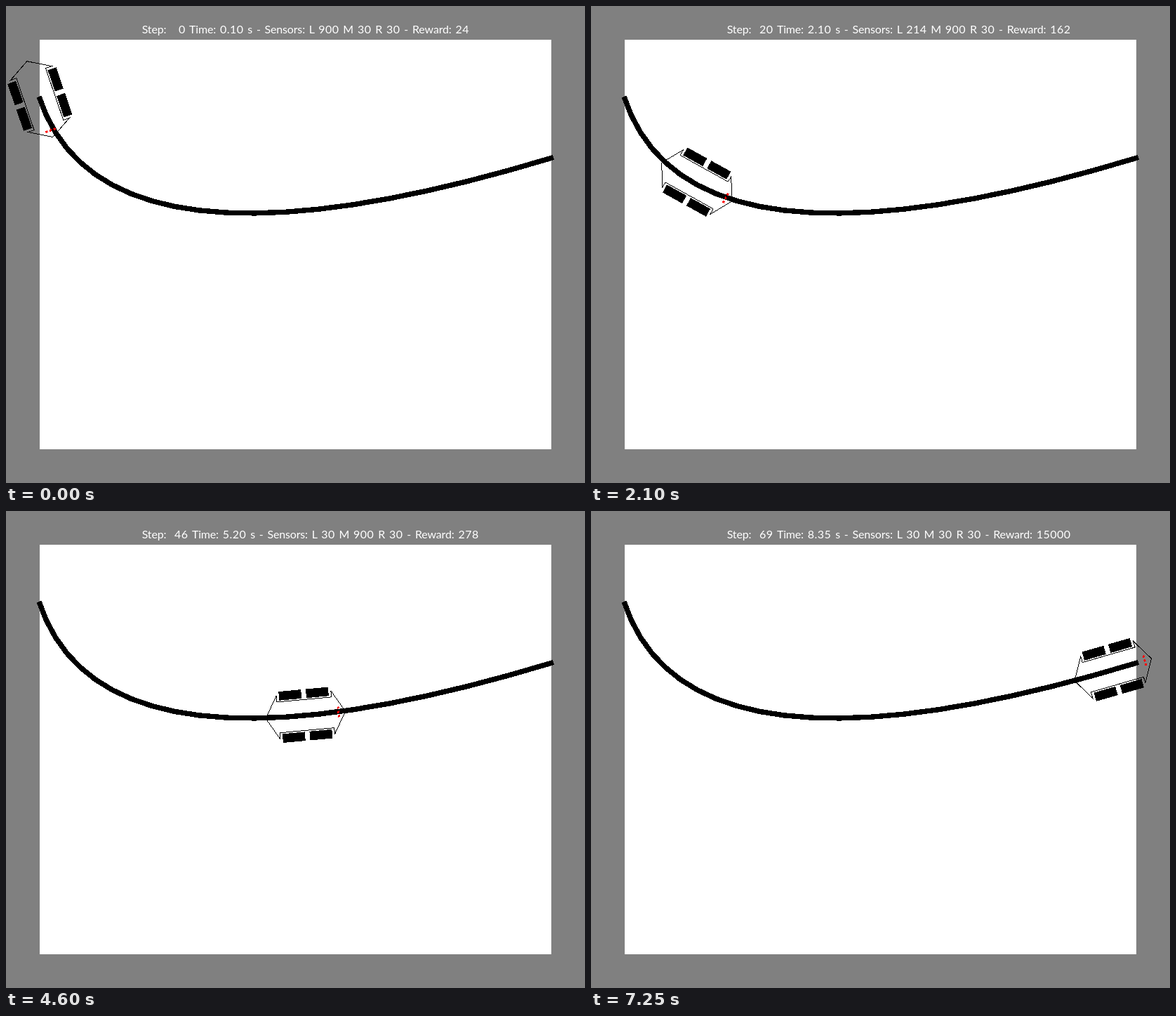
Write an HTML page that moves like this. It is 825x679 px and loops after 7.4 s.

```html
<!DOCTYPE html>
<html>
<head>
<meta charset="utf-8">
<title>Line follower</title>
<style>
html, body { margin: 0; width: 825px; height: 679px; overflow: hidden; background: #808080; }
svg { display: block; shape-rendering: crispEdges; }
text { font: 16px Lato, "Open Sans", sans-serif; fill: #fff; white-space: pre; letter-spacing: -.16px; word-spacing: 1.92px; }
tspan { letter-spacing: .47px; }
</style>
</head>
<body>
<svg width="825" height="679">
  <rect x="48" y="48" width="729" height="583" fill="#fff"/>
  <polyline id="track" fill="none" stroke="#000" stroke-width="7.4"/>
  <g id="car">
    <path d="M-57 0L-39 -31V-22H39V-31L57 0L39 31V22H-39V31Z" fill="none" stroke="#000"/>
    <path id="wheels"/>
    <path d="M45.5 -7.5h3v3h-3zm0 6h3v3h-3zm0 6h3v3h-3z" fill="#f00"/>
  </g>
  <text id="status" x="193.7" y="39"></text>
</svg>
<script>
const $ = id => document.getElementById(id);
const LOOP = 7400, LAST = 69, SEGMENTS = 20;

// Key moments; everything between them runs evenly
const moments = [
  { step: 0, ms: 0, time: 0.1, place: 0.13, left: 900, middle: 30, reward: 24 },
  { step: 10, ms: 1000, time: 1.1, place: 2.99, left: 883, middle: 510, reward: 27 },
  { step: 20, ms: 2100, time: 2.1, place: 5.91, left: 214, middle: 900, reward: 162 },
  { step: 30, ms: 3000, time: 3.2, place: 8.98, left: 227, middle: 900, reward: 199 },
  { step: 40, ms: 3900, time: 4.4, place: 11.92, left: 30, middle: 900, reward: 245 },
  { step: 52, ms: 5300, time: 6, place: 15.33, left: 30, middle: 900, reward: 310 },
  { step: LAST, ms: 7250, time: 8.35, place: 19.43, left: 30, middle: 900, reward: 405 }
];

function stateAt(step) {
  const next = Math.max(1, moments.findIndex(m => m.step >= step));
  const a = moments[next - 1], b = moments[next];
  const u = (step - a.step) / (b.step - a.step);
  const state = {};
  for (const key in a) state[key] = a[key] + (b[key] - a[key]) * u;
  if (step === LAST) Object.assign(state, { middle: 30, reward: 15000 });
  return state;
}

// The track is a parabola; k counts its segments
const point = k => [47 + 9.15 * k + 1.375 * k * k, 129 + 28.075 * k - 1.1875 * k * k];
const slope = k => [9.15 + 2.75 * k, 28.075 - 2.375 * k];

// The car heads along the track and drifts to the inside of the bend
function carTransform(k) {
  const [x, y] = point(k), [dx, dy] = slope(k);
  const speed = Math.hypot(dx, dy);
  const curvature = 98.9 / speed ** 3;
  const drift = 800 * curvature * Math.min(1, k / 5);
  const angle = Math.atan2(dy, dx) * 180 / Math.PI;
  return `translate(${x + drift * dy / speed} ${y - drift * dx / speed}) rotate(${angle})`;
}

function statusText(s) {
  const text = `Step: ${String(s.step).padStart(3)} Time: ${(Math.round(s.time * 20) / 20).toFixed(2)} s` +
    ` - Sensors: L ${Math.round(s.left)} M ${Math.round(s.middle)} R 30 - Reward: ${Math.round(s.reward)}`;
  return text.replace(/[\d.]+/g, '<tspan>$&</tspan>');
}

$('track').setAttribute('points', Array.from({ length: SEGMENTS + 1 }, (_, k) => point(k)).join(' '));

let wheels = '';
for (const x of [-35.4, 3.4])
  for (const y of [-36.6, 23.9]) wheels += `M${x} ${y}h32v12.7h-32z`;
$('wheels').setAttribute('d', wheels);

const states = Array.from({ length: LAST + 1 }, (_, step) => stateAt(step));
let shown, origin;

function draw(t) {
  const state = states.findLast(s => Math.round(s.ms / 50) * 50 <= t);
  if (state === shown) return;
  shown = state;
  $('car').setAttribute('transform', carTransform(state.place));
  $('status').innerHTML = statusText(state);
}

function tick(now) {
  origin ??= now;
  draw((now - origin) % LOOP);
  requestAnimationFrame(tick);
}
draw(0);
requestAnimationFrame(tick);
</script>
</body>
</html>
```
